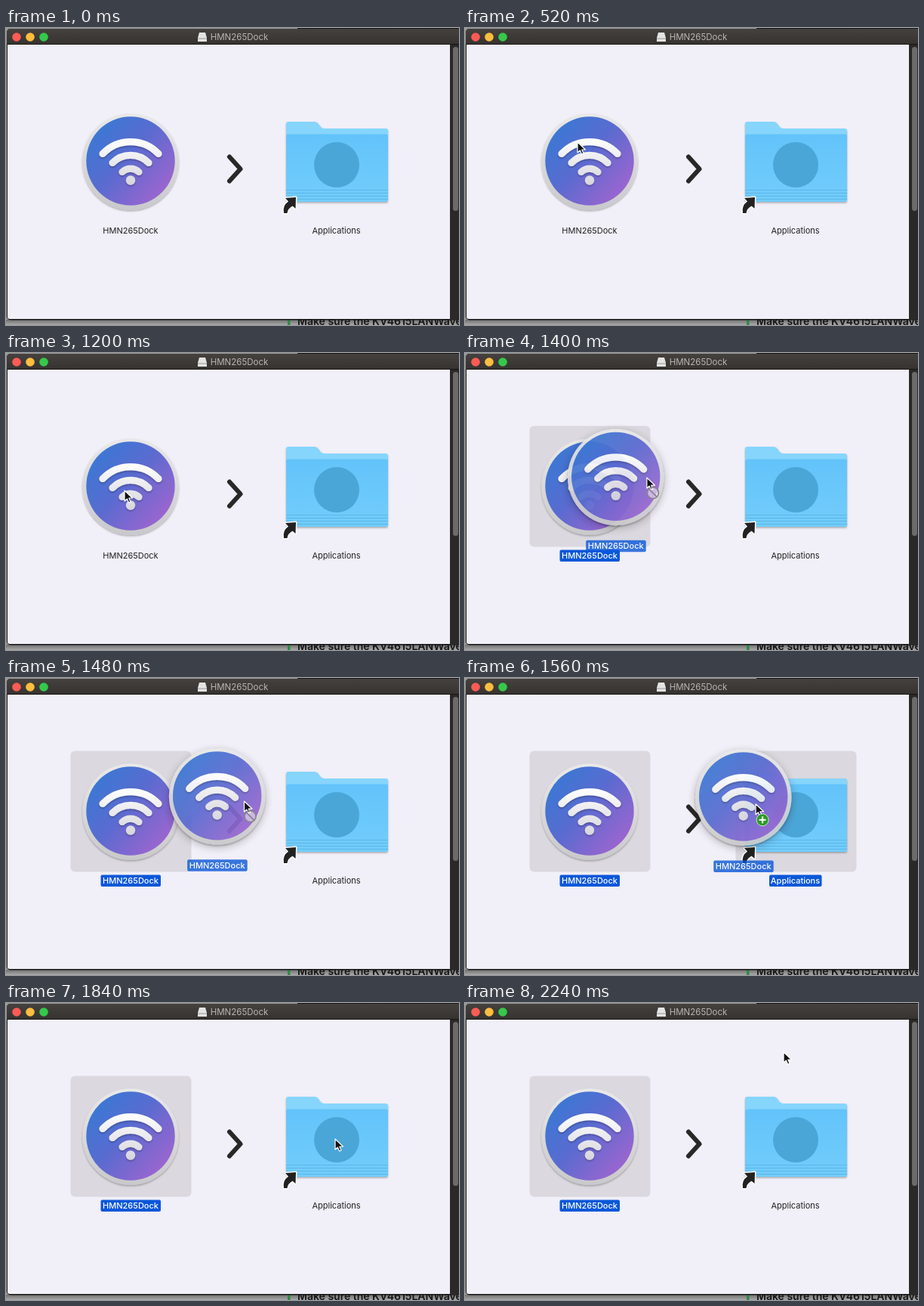
Write an HTML page that moves like this. It is 600 px wide and 393 px high and loops after 2.28 s.

```html
<!DOCTYPE html>
<html lang="en">
<head>
<meta charset="utf-8">
<title>Drag to install</title>
<style>
html, body { margin: 0; width: 100%; height: 100%; overflow: hidden; background: #999; }
svg { display: block; width: 600px; height: 393px; }
text { font: 11px Inter, "Open Sans", sans-serif; text-anchor: middle; fill: #222; }
.picked rect { fill: #0a57d9; }
.picked text { fill: #fff; font-weight: 500; }
</style>
</head>
<body>
<svg viewBox="0 0 600 393">
  <defs>
    <linearGradient id="disc" x1=".1" y1=".15" x2=".9" y2=".85">
      <stop stop-color="#3b78d4"/><stop offset=".45" stop-color="#5a6bd0"/><stop offset="1" stop-color="#9d65cf"/>
    </linearGradient>
    <linearGradient id="rim" x2="0" y2="1">
      <stop stop-color="#e9e9e9"/><stop offset="1" stop-color="#c9c9cb"/>
    </linearGradient>
    <linearGradient id="wave" gradientUnits="userSpaceOnUse" x1="0" y1="-31" x2="0" y2="30">
      <stop stop-color="#fff"/><stop offset="1" stop-color="#d6d6dc"/>
    </linearGradient>
    <linearGradient id="bar" x2="0" y2="1">
      <stop stop-color="#45413e"/><stop offset="1" stop-color="#35322f"/>
    </linearGradient>
    <linearGradient id="front" x2="0" y2="1">
      <stop stop-color="#63c3fa"/><stop offset="1" stop-color="#72cdfb"/>
    </linearGradient>
    <linearGradient id="below" x2="0" y2="1">
      <stop stop-color="#707070"/><stop offset="1" stop-color="#a8a8a8"/>
    </linearGradient>
    <filter id="soft" x="-20%" y="-20%" width="140%" height="140%">
      <feDropShadow dx="0" dy="1.5" stdDeviation="1.2" flood-opacity=".3"/>
    </filter>
    <filter id="lift" x="-20%" y="-20%" width="140%" height="140%">
      <feDropShadow dx="0" dy="3" stdDeviation="6" flood-opacity=".25"/>
    </filter>
    <!-- App icon, centred on 0,0 -->
    <g id="app">
      <circle r="63.8" fill="url(#rim)" filter="url(#soft)"/>
      <circle cy="-1" r="58.7" fill="url(#disc)"/>
      <g filter="url(#soft)">
        <path id="arcs" fill="none" stroke="url(#wave)" stroke-width="9.2" stroke-linecap="round"/>
        <circle cy="24.5" r="6.2" fill="url(#wave)"/>
      </g>
    </g>
    <rect id="plate" x="-79.5" y="-80.5" width="160" height="160" rx="6" fill="#dbd9df"/>
    <g id="tag" class="picked">
      <rect x="-39.5" y="83.5" width="79.5" height="15.5" rx="2"/>
      <text y="95">HMN265Dock</text>
    </g>
  </defs>

  <!-- Desktop behind the window -->
  <rect y="386" width="600" height="7" fill="url(#below)"/>
  <rect x="373" y="386" width="3.5" height="7" fill="#2f8a45"/>
  <text x="386" y="393" style="font-size:14px;font-weight:600;text-anchor:start;fill:#151515">Make sure the KV4615LANWave</text>
  <rect x="386" width="214" height="6" fill="#161616"/>

  <!-- Window -->
  <rect x="1" y="1" width="604" height="385.5" rx="5" fill="#161616"/>
  <path d="M1 22V6Q1 1 6 1H600V22Z" fill="url(#bar)"/>
  <path d="M1 21.5H600" stroke="#171615"/>
  <path d="M2 22H588V385H5Q2 385 2 382Z" fill="#f1eff7"/>
  <rect x="588" y="22" width="12" height="364" fill="#2a2928"/>
  <rect x="592" y="25" width="7" height="217" rx="3.5" fill="#6d6b6a"/>
  <circle cx="14" cy="12" r="5.8" fill="#fc5b55"/>
  <circle cx="32" cy="12" r="5.8" fill="#fdbd3e"/>
  <circle cx="50" cy="12" r="5.8" fill="#35c84a"/>
  <path d="M256 6H264L266 13V18H254V13Z" fill="#e4e4e4"/>
  <path d="M254 14H266" stroke="#999"/>
  <text x="309" y="16" style="font-size:11.5px;fill:#b9b6b4">HMN265Dock</text>

  <path d="M296 170.500L310.500 186.500 296 202.500" fill="none" stroke="#282828" stroke-width="6" stroke-linecap="round" stroke-linejoin="round"/>

  <g transform="translate(165 177)">
    <use id="appPlate" href="#plate"/>
    <use href="#app"/>
    <text id="appName" y="95">HMN265Dock</text>
    <use id="appTag" href="#tag"/>
  </g>

  <!-- Folder -->
  <use id="folderPlate" href="#plate" x="438" y="177"/>
  <g filter="url(#soft)">
    <path d="M371 127Q371 124 374 124H408Q412 124 414 127L417 131Q419 133 422 133H503Q506 133 506 136V160H371Z" fill="#86d5fc"/>
    <rect x="371" y="140.500" width="135" height="89.500" rx="2.500" fill="url(#front)"/>
  </g>
  <path d="M438.500 214V229" stroke="#4fa9dc" stroke-opacity=".6" stroke-width="135" stroke-dasharray="1 3"/>
  <circle cx="438" cy="181" r="30" fill="#4ba6d8"/>
  <path d="M370 225L384 224 383.500 239 379.500 235.500Q373 239 372.500 245H368Q366 235 374 229.500Z" fill="#222" stroke="#fff" stroke-width="3" stroke-linejoin="round" paint-order="stroke"/>
  <g id="folderTag" class="picked">
    <rect x="403" y="260.500" width="69.500" height="15.500" rx="2"/>
    <text x="437.500" y="272">Applications</text>
  </g>
  <text id="folderName" x="437.500" y="272">Applications</text>

  <g id="ghost">
    <use href="#app" opacity=".93" filter="url(#lift)"/>
    <use href="#tag" opacity=".8"/>
  </g>

  <g id="cursor">
    <path d="M0 0V14L3.300 11 5.600 16 8 15 5.800 10H10.500Z" fill="#111" stroke="#fff" stroke-width="1.200" stroke-linejoin="round"/>
    <g id="deny" fill="#fff" fill-opacity=".5" stroke="#8a848a" stroke-width="1.800">
      <circle cx="8" cy="20" r="7.500"/><path d="M3 15L13 25"/>
    </g>
    <g id="plus">
      <circle cx="9" cy="21" r="8" fill="#2b9a22" stroke="#e8f5e6" stroke-width=".8"/>
      <path d="M4.500 21H13.500M9 16.500V25.500" stroke="#fff" stroke-width="2.200"/>
    </g>
  </g>
</svg>
<script>
const LOOP = 2280, STEP = 40, GRAB = 1240, OVER = 1560, DROP = 1760;
const $ = id => document.getElementById(id);

// Three nested arcs, each smaller and lower than the last
$("arcs").setAttribute("d", [0, 1, 2].map(i => {
  const w = 37 - 13 * i, y = 12 * i - 10.5, r = 51 - 17.5 * i;
  return `M${-w} ${y}A${r} ${r} 0 0 1 ${w} ${y}`;
}).join(""));

// Each stroke eases between two points and bows sideways by `bend`
const rest = [149, 151], far = [488, 180], grip = [157, 182], drop = [436, 180];
const strokes = [
  { start: 40, end: 520, from: [588, 11], to: rest, bend: [-137, 119] },
  { start: 560, end: 880, from: rest, to: far, bend: [-180, 60] },
  { start: 880, end: 1160, from: far, to: grip, bend: [0, -62] },
  { start: GRAB, end: 1680, from: grip, to: drop, bend: [0, -18] },
  { start: 1840, end: 2240, from: drop, to: [422, 65], bend: [150, -75] }
];
const carry = { start: 1320, end: 1680, from: [165, 177], to: [440, 173.5], bend: [0, -19] };

function glide({ start, end, from, to, bend }, t) {
  const k = Math.min(1, Math.max(0, (t - start) / (end - start)));
  const ease = k * k * (3 - 2 * k), bow = Math.sin(Math.PI * k);
  return from.map((a, i) => a + (to[i] - a) * ease + bend[i] * bow);
}

const show = (id, on) => $(id).style.display = on ? "" : "none";
const place = (id, stroke, t) => $(id).setAttribute("transform", `translate(${glide(stroke, t)})`);

function draw(now) {
  const t = Math.floor(now % LOOP / STEP) * STEP;
  const picked = t >= GRAB, dragging = picked && t < DROP;
  const over = dragging && t >= OVER;
  show("appPlate", picked);
  show("appTag", picked);
  show("appName", !picked);
  show("folderPlate", over);
  show("folderTag", over);
  show("folderName", !over);
  show("ghost", dragging);
  show("deny", dragging && !over);
  show("plus", over);
  show("cursor", t > 0);
  place("cursor", strokes.findLast(s => s.start <= t) || strokes[0], t);
  place("ghost", carry, t);
}

const start = performance.now();
function tick() {
  draw(performance.now() - start);
  requestAnimationFrame(tick);
}
tick();
</script>
</body>
</html>
```
